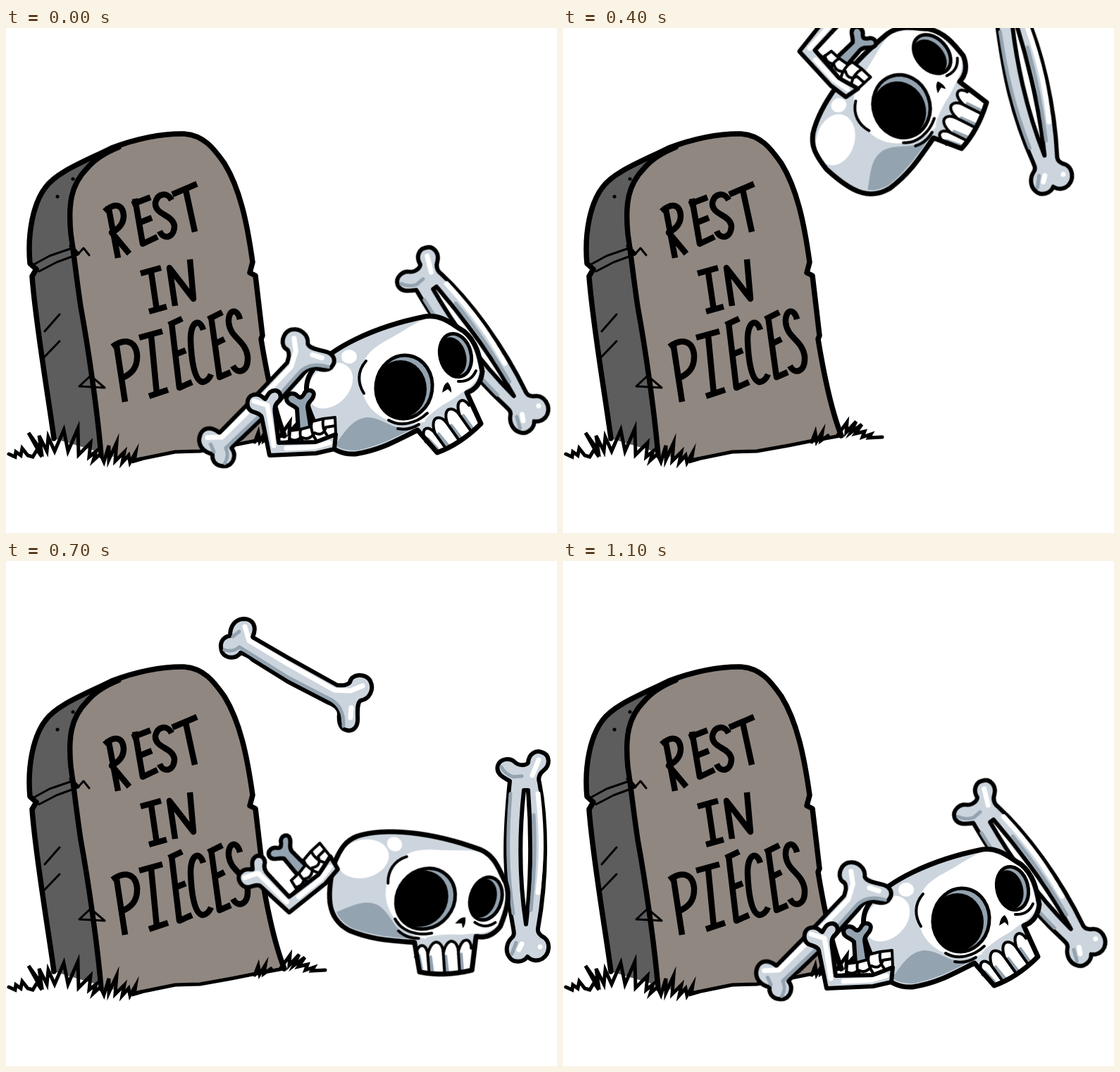
Animation of 782x716 px, one loop 2.2 s. Source, as an HTML page:

```html
<!DOCTYPE html>
<html lang="en">
<head>
<meta charset="utf-8">
<title>Rest in pieces</title>
<style>
  html, body { margin: 0; width: 100%; height: 100%; overflow: hidden; background: #fff; }
  svg { display: block; width: 100vw; height: 100vh; }
  path, ellipse { stroke-linecap: round; stroke-linejoin: round; }
  .line { fill: none; stroke: #000; }
  .edge { stroke: #000; stroke-width: 6; }
  .bone { fill: #ccd5dd; }
  .lit { fill: #fff; }
  .dark { fill: #94a3b0; }
  .lit-line { fill: none; stroke: #fff; stroke-width: 7; }
  .dark-line { fill: none; stroke: #94a3b0; stroke-width: 5; }
  #lettering path { stroke-linecap: butt; }
  #grass path { stroke-linejoin: miter; stroke-miterlimit: 6; }

  .part { animation: 2200ms step-end infinite; }
  #skull { transform-origin: 565px 508px; animation-name: skull; }
  #pair  { transform-origin: 739px 420px; animation-name: pair; }
  #long  { transform-origin: 410px 155px; animation-name: long; }
  #jaw   { transform-origin: 415px 560px; animation-name: jaw; }

  /* One pose every 100 ms: the parts vanish, drop in, then rest. */
  @keyframes skull {
    0%, 40.909%, 100% { transform: none; }
    4.545%  { transform: translate(0, -1200px); }
    13.636% { transform: translate(-155px, -543px) rotate(-55deg); }
    18.181% { transform: translate(-85px, -398px) rotate(-28deg); }
    22.727% { transform: translate(-16px, -262px); }
    27.272% { transform: translate(22px, -172px) rotate(36deg); }
    31.818% { transform: translate(31px, -30px) rotate(31.5deg); }
    36.363% { transform: translate(15px, -14px) rotate(15deg); }
  }
  @keyframes pair {
    0%, 40.909%, 100% { transform: translate(-73.5px, 24.5px) rotate(-36.2deg); }
    4.545%  { transform: translate(0, -1200px); }
    13.636% { transform: translate(-109px, -479px) rotate(-13deg); }
    18.181% { transform: translate(-76px, -332px) rotate(-13deg); }
    22.727% { transform: translate(-43px, -185px) rotate(-13deg); }
    27.272% { transform: translate(-20px, -80px) rotate(-13deg); }
    31.818% { transform: none; }
    36.363% { transform: translate(-35px, 13px) rotate(-18deg); }
  }
  @keyframes long {
    0%, 50%, 100% { transform: translate(-46.5px, 372.5px) rotate(-75.5deg); }
    4.545%  { transform: translate(0, -1200px); }
    22.727% { transform: translate(0, -159px) rotate(-8deg); }
    27.272% { transform: translate(0, -86px); }
    31.818% { transform: none; }
    36.363% { transform: translate(-18px, 130px) rotate(-10deg); }
    40.909% { transform: translate(-41px, 264.5px) rotate(-18.5deg); }
    45.454% { transform: translate(-45px, 322px) rotate(-47deg); }
  }
  @keyframes jaw {
    0%, 40.909%, 100% { transform: none; }
    4.545%  { transform: translate(0, -1200px); }
    18.181% { transform: translate(-18px, -525px) rotate(50deg); }
    22.727% { transform: translate(-16px, -382px) rotate(30deg); }
    27.272% { transform: translate(-19px, -251px); }
    31.818% { transform: translate(-7px, -123px) rotate(-36deg); }
    36.363% { transform: translate(-5px, -62px) rotate(-18deg); }
  }
</style>
</head>
<body>
<svg viewBox="0 0 782 716" preserveAspectRatio="none" role="img" aria-label="Gravestone reading: Rest in pieces">

  <g id="stone">
    <path fill="#5d5d5d" d="M68 582C62 535 42 420 37 352L43 342 34 334C30 290 39 248 56 226C72 204 110 190 150 170L180 165 145 605Z"/>
    <path fill="#908781" d="M135 606C130 545 117 455 106 395C100 355 97 325 92 292C88 250 92 222 115 199C140 176 200 150 250 150C280 150 296 172 310 192C332 228 342 275 350 332L346 347 354 351 364 436 362 441C370 490 380 540 395 578L320 592 275 600 240 601 190 612Z"/>
    <path class="line" stroke-width="7.5" d="M68 582C62 535 42 420 37 352L43 342 34 334C30 290 39 248 56 226C72 204 110 190 150 170C185 157 220 150 250 150C280 150 296 172 310 192C332 228 342 275 350 332L346 347 354 351 364 436 362 441C370 490 380 540 395 578"/>
    <path class="line" stroke-width="7.5" d="M135 606C130 545 117 455 106 395C100 355 97 325 92 292C88 250 92 222 115 199Q130 181 160 169"/>
    <path class="line" stroke-width="5" d="M186 612L240 601 275 600 320 592 350 586 394 578"/>
    <path class="line" stroke-width="3" d="M40 335L62 323 97 311M47 345L72 332 102 321 110 312 118 322M55 430L76 406M53 468L76 444M104 508L120 493 140 510Z"/>
    <path class="line" stroke-width="5" d="M95 214h.1M73 239h.1M92 309l10 11"/>
  </g>

  <!-- Hand-carved lettering -->
  <g id="lettering" class="line" stroke-width="8.5">
    <path d="M145 252L159 326M140 260C155 246 166 251 167 266C167 279 158 286 150 290L175 320"/>
    <path d="M183 242L194 306 215 296M179 250L205 240M187 277L207 269"/>
    <path d="M235 244C229 232 215 234 212 248C211 265 236 264 239 280C239 298 224 301 218 288"/>
    <path d="M236 236L271 221M255 229L268 289"/>
    <path d="M191 348L220 340M206 346L214 400M203 402L228 395"/>
    <path d="M240 394L232 340 266 384 261 328"/>
    <path d="M156 445L169 530M151 452C170 438 184 445 186 463C187 482 178 491 163 497"/>
    <path d="M189 439L222 430M206 436L214 519M203 522L230 513"/>
    <path d="M235 418L246 510 264 502M231 421L250 412M240 463L255 457"/>
    <path d="M280 428C275 411 262 415 262 442C263 470 267 500 279 502Q287 501 291 491"/>
    <path d="M291 409L303 495 319 488M287 413L307 403M296 448L310 441"/>
    <path d="M332 413C328 396 315 399 316 417C318 440 340 442 343 466C344 488 329 492 322 479"/>
  </g>

  <g id="grass" class="line" stroke-width="5">
    <path d="M4 604L13 608 14 601 21 606 23 596 31 606 38 608 44 598 51 608 32 574 50 599 47 578 58 600 60 580 69 600 82 570 88 600 102 568 103 605 120 588 118 608 128 600 124 613 134 604 139 615 146 592 146 612 157 588 155 614 168 601 165 616 174 606 176 616 184 602 182 614 192 611"/>
    <path d="M353 587L358 574 360 586 368 573 366 585 376 578M390 577L403 559 402 573 416 558 408 574 424 562 415 575 428 572 425 580 437 576 434 581 453 580"/>
  </g>

  <g id="pair" class="part">
    <path class="bone edge" fill-rule="evenodd" d="M715 312C704 306 695 301 698 290C702 279 716 279 722 285C728 291 738 290 741 286C742 273 752 268 760 271C772 274 773 289 763 297C757 301 755 308 757 314C768 370 768 450 755 521C754 527 758 531 764 534C773 541 772 557 761 564C752 569 744 565 740 561C735 569 720 571 714 561C708 553 711 541 717 535C722 531 721 527 720 521C706 450 707 390 715 312ZM735 325C728 390 728 450 738 515C745 460 746 390 741 325Z"/>
    <path class="dark-line" d="M703 292Q708 302 720 306L732 305M716 330C711 390 711 440 720 500M749 360C752 410 749 450 745 495M718 557L724 541"/>
    <path class="lit-line" d="M756 282L747 304M755 330C762 390 760 430 755 470M758 547v.1M732 543L728 551"/>
  </g>

  <g id="skull" class="part">
    <path class="bone" d="M436 484C462 454 520 424 595 409C620 406 632 420 650 430C668 445 672 465 676 487C674 504 666 513 654 517L674 561Q645 590 612 602L584 570C552 586 532 598 496 604C460 606 444 580 429 538C424 510 426 497 436 484Z"/>
    <path class="lit" d="M505 508C500 474 512 458 540 443C565 430 580 416 604 410L642 427C662 440 667 465 672 488C668 505 654 512 640 522L594 558C560 570 508 552 505 508Z"/>
    <ellipse class="lit" cx="460" cy="507" rx="37" ry="27" transform="rotate(-46 460 507)"/>
    <ellipse class="lit" cx="487" cy="466" rx="11" ry="10"/>
    <path class="dark" d="M467 591C482 572 490 555 512 552C535 552 545 570 577 568C550 582 530 592 498 599Q478 600 467 591Z"/>
    <path class="bone" d="M594 556C610 538 640 522 655 517L664 538 610 562Z"/>
    <path class="lit" d="M596 587C586 566 600 562 609 575C600 550 617 546 627 562C618 538 634 534 644 549C636 526 650 523 657 535L671 560Q645 588 612 599Z"/>
    <path class="dark-line" d="M599 583L612 597M614 576L628 593M632 564L646 582M649 550L662 568"/>
    <path class="line" stroke-width="4" d="M596 587C586 566 600 562 609 575C600 550 617 546 627 562C618 538 634 534 644 549C636 526 650 523 657 535M609 575L625 597M627 562L644 586M644 549L661 573"/>
    <ellipse class="dark" cx="565" cy="509" rx="40" ry="45" stroke="#000" stroke-width="5" transform="rotate(8 565 509)"/>
    <ellipse cx="560" cy="512" rx="37" ry="41"/>
    <ellipse class="dark" cx="638" cy="464" rx="22" ry="31" stroke="#000" stroke-width="5" transform="rotate(-14 638 464)"/>
    <ellipse cx="634" cy="466" rx="19" ry="28" transform="rotate(-14 634 466)"/>
    <path d="M619 517Q621 504 627 502Q633 510 632 517L627 512Z"/>
    <path class="line" stroke-width="4" d="M511 472C498 487 499 504 508 518M543 556C560 566 582 561 598 546M556 568Q572 571 586 562M642 501Q660 502 667 486"/>
    <path class="line" stroke-width="7" d="M436 484C462 454 520 424 595 409C620 406 632 420 650 430C668 445 672 465 676 487C674 504 666 513 654 517L674 561Q645 590 612 602L584 570C552 586 532 598 496 604C460 606 444 580 429 538C424 510 426 497 436 484Z"/>
  </g>

  <g id="long" class="part">
    <path class="bone edge" d="M350 108L400 137 470 176C480 177 485 176 488 172C490 160 510 158 517 170C523 182 516 196 503 198C498 202 499 212 499 222C500 236 492 242 484 240C473 238 472 226 473 216C472 208 466 204 458 201L400 171 350 140C345 134 338 132 333 130C326 140 312 138 307 130C302 118 306 108 318 106C318 92 325 83 337 82C350 82 357 92 350 108Z"/>
    <path class="dark-line" d="M310 126Q322 130 331 122L352 135 402 166 462 197Q480 208 479 234M322 107L331 100"/>
    <path class="lit-line" d="M339 93L345 113 400 146 466 183 489 184 506 177M490 208L489 222"/>
  </g>

  <g id="jaw" class="part">
    <path class="dark edge" d="M415 572L413 540C408 534 398 534 398 525C400 516 410 517 414 522C418 526 422 522 424 517C430 510 440 515 436 523C433 530 428 530 428 538L433 570Z"/>
    <path class="lit" stroke="#000" stroke-width="4" d="M388 588L402 586 403 571 418 569 433 565 434 558 450 554 467 552 468 576 440 587Z"/>
    <path class="line" stroke-width="4" d="M418 569Q416 580 421 586M433 564Q434 576 440 584M450 555Q448 568 456 578M402 582Q411 588 419 580Q430 586 438 574Q450 580 454 566L467 564"/>
    <path class="bone edge" d="M363 552C361 546 354 546 348 543C340 537 341 523 351 520C361 518 364 524 368 526C372 520 374 513 383 514C391 516 392 526 385 531C379 538 382 545 383 556L387 588 440 587 468 576 466 597 440 603 374 606Z"/>
    <path class="lit-line" stroke-width="6" d="M352 529L371 535 374 552 380 592M398 596L438 594 459 588"/>
  </g>
</svg>
</body>
</html>
```
